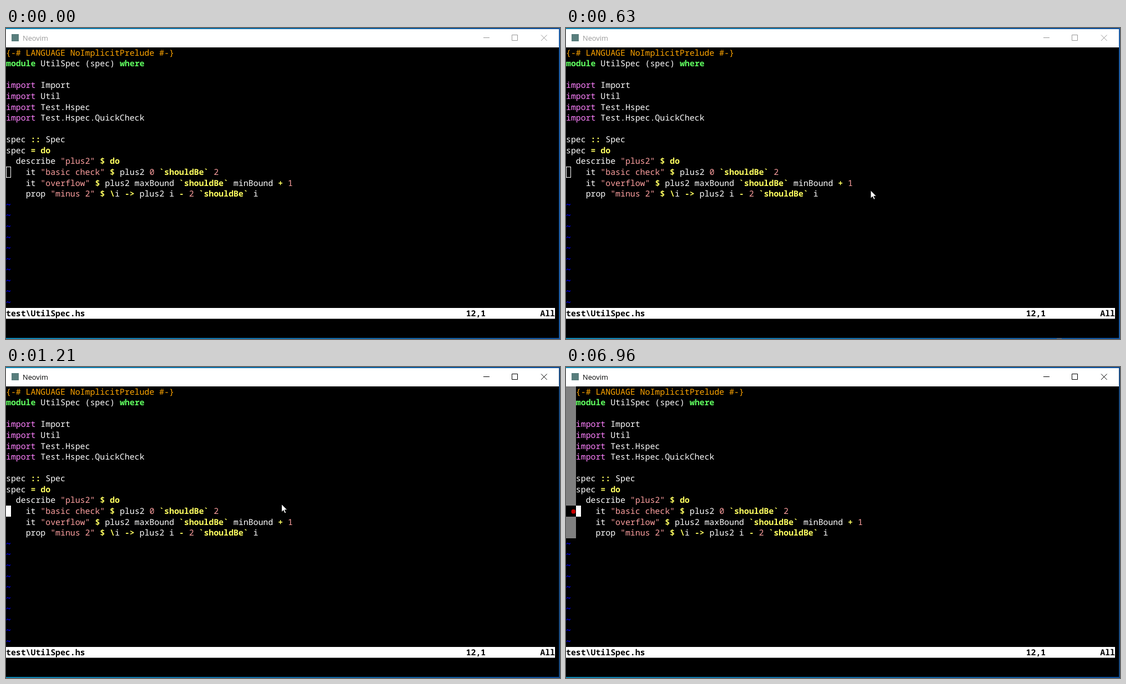
These frames come from a looping animation (998 px wide and 561 px high, 8 s). An HTML page:

```html
<!DOCTYPE html>
<html lang="en">
<head>
<meta charset="utf-8">
<title>Editor session</title>
<style>
html, body { margin: 0; width: 100%; height: 100%; overflow: hidden; background: #000; }
svg { display: block; }
text { white-space: pre; }
.mono { font: 14.85px "Noto Sans Mono", "DejaVu Sans Mono", monospace; text-rendering: geometricPrecision; }
.bold { font-weight: 700; }
.title { font: 12.8px "Open Sans", "Noto Sans", sans-serif; }
</style>
</head>
<body>
<svg id="stage" width="998" height="561" viewBox="0 0 998 561">
  <defs>
    <linearGradient id="edge">
      <stop offset="0" stop-color="#0d86b4"/>
      <stop offset="1" stop-color="#0d4f9c"/>
    </linearGradient>
  </defs>
  <rect width="998" height="561" fill="#000"/>
  <rect y="2" width="996" height="33" fill="#fff"/>
  <rect width="998" height="2" fill="url(#edge)"/>
  <rect y="559" width="998" height="2" fill="url(#edge)"/>
  <rect id="side" x="996" width="2" height="561" fill="#1a5ca6"/>
  <rect id="mark" x="884" y="560" width="9" height="1" fill="#86705c"/>
  <rect x="10" y="11" width="13" height="13" fill="#587d7c"/>
  <g id="caption">
    <text class="title" x="30" y="23">Neovim</text>
    <path d="M860 17.5h11M911.5 12.5h10v10h-10zM964 12.5l10.5 10.5M974.5 12.5l-10.5 10.5" fill="none" stroke="currentColor"/>
  </g>
  <g id="gutter">
    <rect y="35" width="18" height="274" fill="#808080"/>
    <rect y="250" width="18" height="20" fill="#000"/>
    <circle cx="13.4" cy="260.7" r="3.9" fill="#c80000"/>
  </g>
  <g id="code"></g>
  <g id="tildes"></g>
  <rect y="505" width="989" height="19.5" fill="#fff"/>
  <g id="status"></g>
  <rect id="caret" width="8" height="19" stroke="#fff"/>
  <path id="pointer" d="M.5.5v14.2l3.3-3.1 2.4 5.2 2.3-1-2.4-5h4.5z" fill="#fff" stroke="#000" stroke-width=".8"/>
</svg>
<script>
const LOOP = 8000, CELL = 8.91, ROW = 19.58, TOP = 35;
const $ = id => document.getElementById(id);

const source = `{-# LANGUAGE NoImplicitPrelude #-}
module UtilSpec (spec) where

import Import
import Util
import Test.Hspec
import Test.Hspec.QuickCheck

spec :: Spec
spec = do
  describe "plus2" $ do
    it "basic check" $ plus2 0 \`shouldBe\` 2
    it "overflow" $ plus2 maxBound \`shouldBe\` minBound + 1
    prop "minus 2" $ \\i -> plus2 i - 2 \`shouldBe\` i`.split("\n");

const syntax = /(?<pragma>\{-#.*#-\})|(?<type>\b(?:module|where)\b)|(?<include>\bimport\b)|(?<literal>"[^"]*"|\b\d\b)|(?<keyword>`\w+`|\bdo\b|::|->|[=$\\+-])/g;
const styles = {
  pragma: ["#ffa500"],
  type: ["#60ff60", true],
  include: ["#ff80ff"],
  literal: ["#ffa0a0"],
  keyword: ["#ffff60", true]
};

function put(group, str, col, row, fill, bold) {
  if (!str.trim()) return;
  const lead = str.length - str.trimStart().length;
  const el = document.createElementNS("http://www.w3.org/2000/svg", "text");
  el.setAttribute("class", bold ? "mono bold" : "mono");
  el.setAttribute("x", (col + lead) * CELL);
  el.setAttribute("y", Math.round(TOP + row * ROW + 14.7));
  el.setAttribute("fill", fill);
  el.textContent = str.trim();
  group.append(el);
  return el;
}

source.forEach((line, row) => {
  let end = 0;
  for (const m of line.matchAll(syntax)) {
    const kind = Object.keys(styles).find(k => m.groups[k]);
    put($("code"), line.slice(end, m.index), end, row, "#fff");
    put($("code"), m[0], m.index, row, ...styles[kind]);
    end = m.index + m[0].length;
  }
  put($("code"), line.slice(end), end, row, "#fff");
});
for (let row = source.length; row < 24; row++) put($("tildes"), "~", 0, row, "#0000ff", true);
put($("status"), "test\\UtilSpec.hs", 0, 24, "#000", true);
const position = put($("status"), "12,1", 93, 24, "#000", true);
put($("status"), "All", 108, 24, "#000", true);

const show = (id, on) => $(id).setAttribute("visibility", on ? "visible" : "hidden");

function pointerAt(t) {
  const u = t >= 840 ? 1 : Math.floor((t - 120) / 35) * 35 / 720;
  const left = Math.pow(1 - u, 1.727);
  return [496 + 376 * left, 247 + 327 * left];
}

function draw(t) {
  const focused = t >= 1090;
  const ink = t >= 1210 ? "#000" : focused ? "#444" : "#999";
  $("caption").setAttribute("fill", ink);
  $("caption").setAttribute("color", ink);
  $("side").setAttribute("fill", focused ? "#174a82" : "#1a5ca6");
  show("mark", t >= 120 && !focused);

  const signs = t >= 6960;
  const shift = signs ? 2 * CELL : 0;
  show("gutter", signs);
  $("code").setAttribute("transform", `translate(${shift} 0)`);

  const row = t >= 2650 && t < 4110 ? 10 : 11;
  position.textContent = `${row + 1},1`;
  $("caret").setAttribute("x", Math.round(shift) + 0.5);
  $("caret").setAttribute("y", Math.round(TOP + row * ROW) + 0.5);
  $("caret").setAttribute("fill", focused ? "#fff" : "none");

  const moving = t >= 120 && t < 2650;
  show("pointer", moving);
  if (moving) $("pointer").setAttribute("transform", `translate(${pointerAt(t)})`);
}

const start = performance.now();
function tick() {
  draw((performance.now() - start) % LOOP);
  requestAnimationFrame(tick);
}
tick();
</script>
</body>
</html>
```
